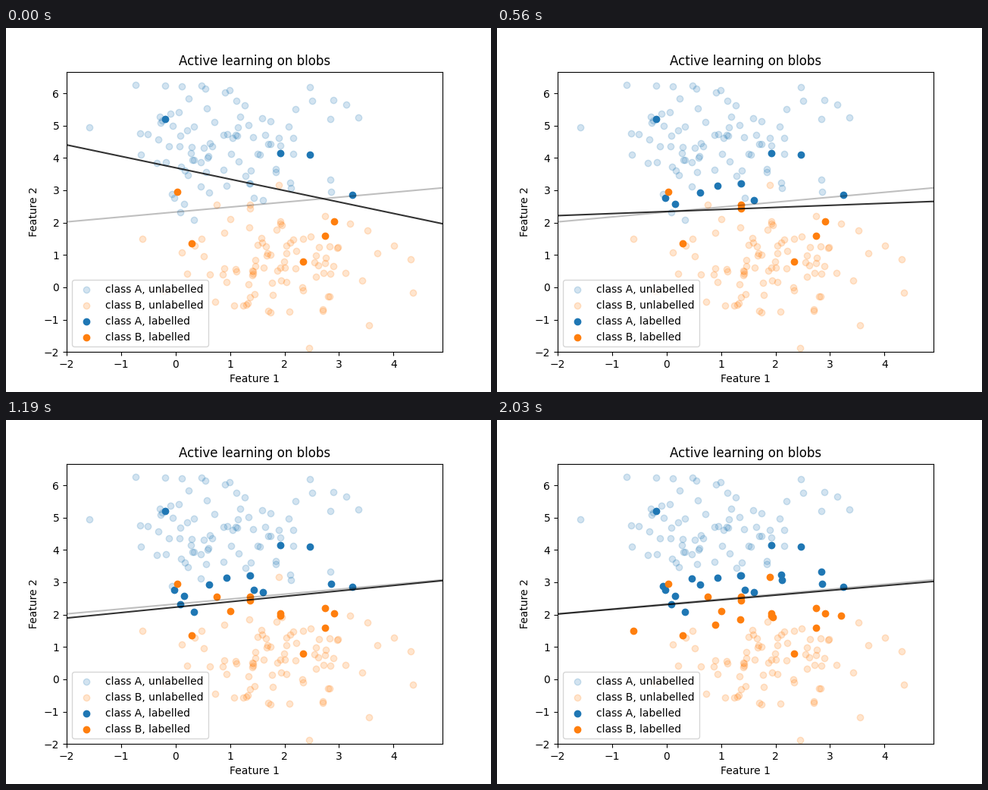
Recreate the animation shown at these times as a matplotlib script. Size 640 by 480 pixels, loop 2.1 s.

```python
import numpy as np
import matplotlib.pyplot as plt
from matplotlib.animation import FuncAnimation

FRAMES, INTERVAL = 30, 70
COLORS = ("tab:blue", "tab:orange")

# Two Gaussian blobs of 100 points each
rng = np.random.RandomState(0)
centers = rng.uniform(-10, 10, (2, 2))
X = np.vstack([rng.normal(c, 1.0, (100, 2)) for c in centers])
y = np.repeat([0, 1], 100)
everything = np.arange(len(X))


def nearest(point):
    return int(np.argmin(np.hypot(*(X - point).T)))


# Samples whose class is known from the start
START = [
    (-0.19, 5.21), (1.93, 4.15), (2.47, 4.10), (3.25, 2.85), (0.02, 2.96),
    (0.30, 1.35), (2.75, 1.59), (2.91, 2.04), (2.34, 0.80),
]


def fit(idx):
    """L2-regularised logistic regression (C = 1) by damped Newton steps."""
    A = np.c_[X[idx], np.ones(len(idx))]
    t = y[idx]
    reg = np.diag([1.0, 1.0, 0.0])

    def loss(w):
        z = A @ w
        return np.sum(np.logaddexp(0, z) - t * z) + 0.5 * w @ reg @ w

    w = np.zeros(3)
    for _ in range(40):
        p = 1 / (1 + np.exp(-A @ w))
        grad = A.T @ (p - t) + reg @ w
        hess = (A * (p * (1 - p))[:, None]).T @ A + reg
        move = np.linalg.solve(hess, grad)
        step = 1.0
        while step > 1e-6 and loss(w - step * move) > loss(w):
            step /= 2
        w = w - step * move
    return w


def boundary(w, x):
    return -(w[0] * x + w[2]) / w[1]


def learn():
    """Uncertainty sampling: label the sample closest to the boundary."""
    labelled = [nearest(p) for p in START]
    steps = []
    for _ in range(FRAMES):
        w = fit(labelled)
        steps.append((list(labelled), w))
        margin = np.abs(X @ w[:2] + w[2])
        margin[labelled] = np.inf
        labelled.append(int(np.argmin(margin)))
    return steps


steps = learn()

fig, ax = plt.subplots(figsize=(6.4, 4.8), dpi=100)
xs = np.array([-2, 4.9])


def scatter(cls, state, alpha):
    name = "AB"[cls]
    return ax.scatter([], [], color=COLORS[cls], alpha=alpha,
                      label=f"class {name}, {state}")


faint = [scatter(c, "unlabelled", 0.2) for c in (0, 1)]
solid = [scatter(c, "labelled", 1.0) for c in (0, 1)]
ax.plot(xs, boundary(fit(everything), xs), color="black", alpha=0.25)
line, = ax.plot(xs, xs, color="black", alpha=0.8)

bottom, top = -2, X[:, 1].max()
ax.set_xlim(*xs)
ax.set_ylim(bottom, top + 0.05 * (top - bottom))
ax.set_title("Active learning on blobs")
ax.set_xlabel("Feature 1")
ax.set_ylabel("Feature 2")
ax.legend(loc="lower left")


def update(i):
    labelled, w = steps[i]
    rest = np.setdiff1d(everything, labelled)
    for c in (0, 1):
        faint[c].set_offsets(X[rest[y[rest] == c]])
        solid[c].set_offsets(X[[k for k in labelled if y[k] == c]])
    line.set_ydata(boundary(w, xs))
    return *faint, *solid, line


anim = FuncAnimation(fig, update, frames=FRAMES, interval=INTERVAL,
                     repeat=True, repeat_delay=0)
plt.show()
```
